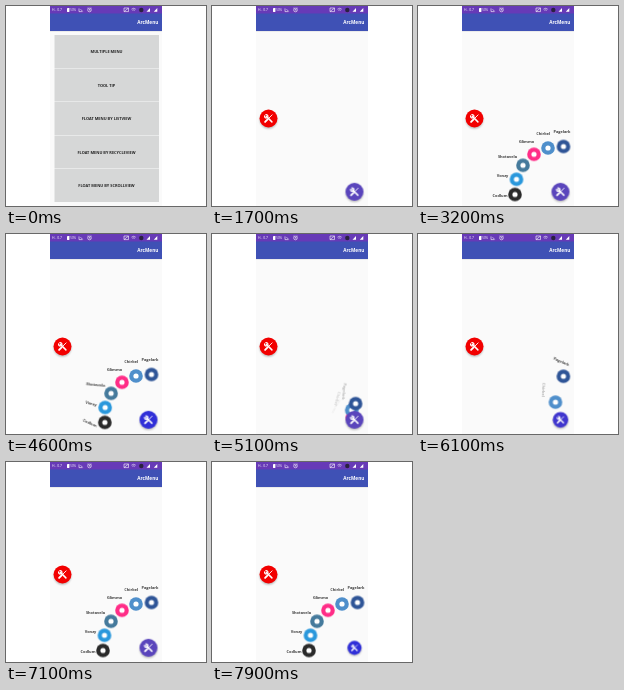
Write an HTML page that moves like this. It is 200x200 px and loops after 8 s.

```html
<!DOCTYPE html>
<html lang="en">
<head>
<meta charset="utf-8">
<title>ArcMenu</title>
<style>
  html, body { margin: 0; width: 100%; height: 100%; overflow: hidden; background: #fff; }
  svg { display: block; width: 100%; height: 100%; }
  text { font: 700 3.9px "Open Sans", "Noto Sans", sans-serif; text-anchor: middle; fill: #222; }
  .bar text { fill: #fff; }
  .bar .title { font-size: 4.7px; text-anchor: end; }
  .bar .small { font-size: 3.4px; font-weight: 400; text-anchor: start; }
  .label { fill: #3c3c3c; }

  .anim { animation: 8s linear infinite; }
  #press { animation-name: press; }
  #page { animation-name: page; }
  #fab { animation-name: pop; }
  #disc { animation-name: tint; }

  @keyframes press {
    0%, 4.9% { opacity: 0; }
    6.25%, 100% { opacity: 1; }
  }
  @keyframes page {
    0%, 11.8% { opacity: 0; transform: translateY(16px); animation-timing-function: ease-out; }
    18.7%, 100% { opacity: 1; transform: none; }
  }
  @keyframes pop {
    0%, 23.5% { transform: scale(1); }
    25% { transform: scale(.8); }
    29%, 52.4% { transform: scale(1); }
    54.4% { transform: scale(.8); }
    57%, 67% { transform: scale(1); }
    69.5%, 75% { transform: scale(.8); }
    79%, 95% { transform: scale(1); }
    97.5%, 100% { transform: scale(.78); }
  }
  @keyframes tint {
    0%, 23.5% { fill: #5a45bc; }
    25%, 30% { fill: #302fd8; }
    36%, 52.4% { fill: #5a45bc; }
    54.4%, 58% { fill: #302fd8; }
    63%, 67% { fill: #5a45bc; }
    69.5%, 75% { fill: #3a33d2; }
    82%, 95% { fill: #5a45bc; }
    97.5%, 100% { fill: #302fd8; }
  }
</style>
</head>
<body>
<svg viewBox="0 0 200 200">
  <defs>
    <clipPath id="screen"><rect x="44" y="0" width="112" height="200"/></clipPath>
    <filter id="blur" x="-50%" y="-50%" width="200%" height="200%"><feGaussianBlur stdDeviation="1.2"/></filter>
    <g id="tools" stroke="#fff" fill="none" stroke-linecap="round">
      <path d="M-2.2-2.2 3.4 3.4" stroke-width="1.5"/>
      <path d="M-3.9-2.6A1.7 1.7 0 1 0-2.6-3.9" stroke-width="1.2"/>
      <path d="M3.6-3.6.4-.4" stroke-width=".9"/>
      <path d="M-.9.9-3.4 3.4" stroke-width="1.9"/>
    </g>
  </defs>
  <g clip-path="url(#screen)">
    <rect x="44" width="112" height="200" fill="#fafafa"/>
    <g id="list"></g>
    <g id="page" class="anim">
      <rect x="44" y="0" width="112" height="220" fill="#fafafa"/>
      <g transform="translate(56.5 112.5)">
        <circle cy="1.5" r="8.6" opacity=".3" filter="url(#blur)"/>
        <circle r="9" fill="#f20000"/>
        <use href="#tools"/>
      </g>
      <g id="items"></g>
      <g transform="translate(142.5 185.8)">
        <g id="fab" class="anim">
          <circle cy="1.5" r="8.6" opacity=".3" filter="url(#blur)"/>
          <circle id="disc" class="anim" r="9"/>
          <use href="#tools"/>
        </g>
      </g>
    </g>
    <g class="bar">
      <rect x="44" y="24.5" width="112" height="1" fill="#000" opacity=".12"/>
      <rect x="44" y="7" width="112" height="18" fill="#3f51b5"/>
      <rect x="44" width="112" height="7.5" fill="#673ab7"/>
      <text class="title" x="152.3" y="17.9">ArcMenu</text>
      <text class="small" x="46" y="5.4">H.. 0.7</text>
      <rect x="61" y="2" width="2.4" height="4" rx=".4" fill="#fff"/>
      <text class="small" x="64.2" y="5.4" style="font-size:3px">50%</text>
      <g fill="none" stroke="#fff" stroke-width=".6">
        <path d="M73 2.4V5.6H76.5M74.5 3.2 76.5 5.2"/>
        <circle cx="83.5" cy="4" r="1.8"/>
        <path d="M83.5 3V4.2H84.4M81.4 2.2 82.3 1.5M85.6 2.2 84.7 1.5"/>
        <path d="M118 2H122.5V5.6H118ZM118.2 5.4 122.3 2.2"/>
        <path d="M125.5 3.2Q127.6 1.4 129.7 3.2M126.5 4.4Q127.6 3.4 128.7 4.4"/>
      </g>
      <circle cx="135.3" cy="4" r="2.2" fill="#2a2140"/>
      <path d="M140.5 5.8H144V2ZM147.8 5.8H151.3V2Z" fill="#fff"/>
    </g>
  </g>
</svg>
<script>
const LOOP = 8000;
const rows = ["MULTIPLE MENU", "TOOL TIP", "FLOAT MENU BY LISTVIEW",
  "FLOAT MENU BY RECYCLEVIEW", "FLOAT MENU BY SCROLLVIEW"];

// name, colour, icon x/y, label x/y
const items = [
  ["Pagelark", "#2f5597", 145.5, 140.5, 144, 126],
  ["Chirbel", "#4f8fcb", 130, 142, 125.3, 127.5],
  ["Glimmo", "#ff2d87", 116, 148.3, 108.5, 136],
  ["Shotavela", "#457a9c", 105, 159.3, 89.5, 151],
  ["Vonzy", "#2a98dc", 98.5, 173.3, 84.5, 169.8],
  ["Codlum", "#2a2a2a", 97, 188.5, 82, 190],
];
const iconHub = [142.5, 185.8], labelHub = [125, 175];
const EASE_OUT = "cubic-bezier(.333,.667,.667,1)";
const EASE_IN = "cubic-bezier(.333,0,.667,.333)";
const OPEN = 313, CLOSE = 500;

let css = "";

// steps: [ms, declarations, easing]
function keyframes(name, steps) {
  css += `@keyframes ${name}{` + steps.map(([ms, rule, ease = "linear"]) =>
    `${(ms / LOOP * 100).toFixed(3)}%{${rule};animation-timing-function:${ease}}`).join("") + "}";
}

// shut -> open -> shut -> open
function cycle(name, i, shut, open, easeOut, easeIn) {
  const a = 1950 + 180 * i, b = 4500 + 40 * (5 - i), c = 5850 + 180 * i;
  keyframes(name, [
    [0, shut], [a, shut, easeOut], [a + OPEN, open],
    [b, open, easeIn], [b + CLOSE, shut],
    [c, shut, easeOut], [c + OPEN, open], [LOOP, open],
  ]);
}

const at = (x, y) => `transform:translate(${x}px,${y}px)`;
const anim = (name, body) => `<g class="anim" style="animation-name:${name}">${body}</g>`;

list.innerHTML = rows.map((name, i) => {
  const y = 29 + 33.5 * i;
  const tile = `x="48.5" y="${y}" width="104.5" height="33"`;
  return `<rect ${tile} fill="#d6d7d7"/>` +
    (i === 1 ? `<rect id="press" class="anim" ${tile} fill="#cbcccc"/>` : "") +
    `<text x="100.5" y="${y + 18}">${name}</text>`;
}).join("");

document.getElementById("items").innerHTML = items.map(([name, colour, x, y, lx, ly], i) => {
  cycle("icon" + i, i, at(...iconHub), at(x, y), EASE_OUT, EASE_IN);
  cycle("tag" + i, i, at(...labelHub), at(lx, ly), EASE_OUT, EASE_IN);
  cycle("spin" + i, i, "transform:rotate(120deg)", "transform:rotate(0deg)");
  cycle("fade" + i, i, "opacity:0", "opacity:1", EASE_OUT, EASE_IN);
  cycle("show" + i, i, "opacity:0", "opacity:1", "step-start", "step-end");
  const icon = `<circle r="6.8" fill="${colour}"/><circle r="2.6" fill="#fff"/>`;
  const label = `<text class="label" y="1.4">${name}</text>`;
  return anim("icon" + i, anim("show" + i, icon)) +
    anim("tag" + i, anim("fade" + i, anim("spin" + i, label)));
}).reverse().join("");

document.head.appendChild(document.createElement("style")).textContent = css;
</script>
</body>
</html>
```
